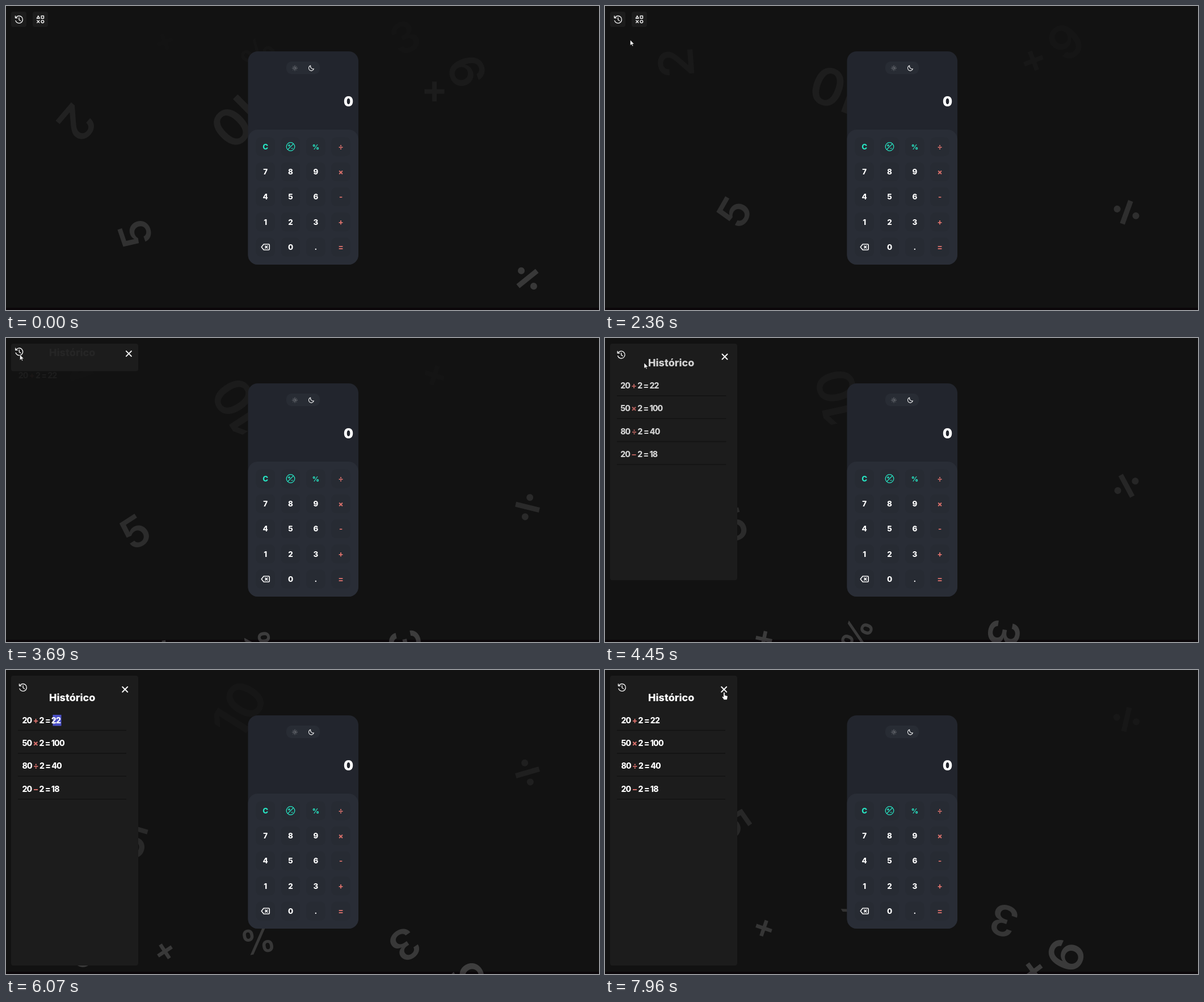
Animation, 1045 px wide and 536 px high, one loop 8 s. Source, as an HTML page:

```html
<!DOCTYPE html>
<html lang="pt">
<head>
<meta charset="utf-8">
<title>Calculadora</title>
<style>
html, body { margin: 0; width: 100%; height: 100%; overflow: hidden; background: #121212; }
svg { display: block; width: 100%; height: 100%; font-family: Inter, "Open Sans", sans-serif; font-weight: 800; }
text { white-space: pre; }
.mid { text-anchor: middle; }
.line { fill: none; stroke: #f4f4f4; stroke-width: 1.4; stroke-linecap: round; stroke-linejoin: round; }
.op { fill: #d8706b; }
.fn { fill: #27e6c4; }
.item { font-size: 14px; letter-spacing: -.85px; }
</style>
</head>
<body>
<svg viewBox="0 0 1045 536" fill="#fff">
  <clipPath id="fold"><rect id="foldBox" width="260"/></clipPath>
  <rect y="532" width="1045" height="4" fill="#0b070a"/>
  <g id="floats"></g>

  <g id="calc">
    <rect x="426.5" y="80" width="194.5" height="376" rx="17" fill="#22252d"/>
    <rect x="426.5" y="218" width="194.5" height="238" rx="17" fill="#292d36"/>
    <rect x="494" y="98" width="59" height="22" rx="9" fill="#282c34"/>
    <g transform="translate(509 109.5)" class="line" style="stroke:#8b8d92;stroke-width:.9" id="sun"><circle r="1.9"/></g>
    <path transform="translate(538 109.5)" class="line" style="stroke-width:1.1" d="M-1.3-4.4A4.6 4.6 0 1 0 4.5 1.2A4.6 4.6 0 0 1-1.3-4.4Z"/>
    <text x="612" y="177" font-size="24" font-weight="900" text-anchor="end">0</text>
    <g id="keys" font-size="13.3" class="mid"></g>
  </g>

  <g id="menuButton">
    <rect x="47" y="10" width="27" height="27" rx="4" fill="#1c1c1c"/>
    <path transform="translate(60.5 23.5)" class="line" d="M-3.7-6.2L-6.2-1.7H-1.2ZM1.7-6H6V-1.7H1.7ZM-5.7 1.9L-1.7 5.9M-1.7 1.9L-5.7 5.9M6.2 3.9a2.3 2.3 0 1 1-4.6 0a2.3 2.3 0 1 1 4.6 0Z"/>
  </g>

  <g id="history">
    <rect id="panel" x="9" y="10" rx="4" fill="#1c1c1c"/>
    <path id="clock" class="line" d="M-5.5-3.4A6.4 6.4 0 1 1-6.1 1.9M-6.5-6.3V-2.9H-3.1M0-3.3V.3L2.4 2"/>
    <path id="close" class="line" style="stroke-width:2" d="M-4.5-4.5L4.5 4.5M4.5-4.5L-4.5 4.5"/>
    <g clip-path="url(#fold)">
      <g id="list">
        <text class="mid" x="116.7" y="55" font-size="18">Histórico</text>
        <rect id="mark" y="79" height="19.5" fill="#4b50c5"/>
        <g id="rows"></g>
      </g>
    </g>
  </g>

  <g id="popup" font-size="6" font-weight="400" class="mid">
    <rect x="4" y="53" width="117" height="19" rx="3" fill="#1f1c2b"/>
    <path d="M44 58V67M78 58V67" stroke="#45414f" stroke-width=".7"/>
    <g fill="#dedce4"><text x="24" y="64.7">Pesquisar</text><text x="59.5" y="64.7">Copiar</text><text x="98" y="64.7">Instantâneo</text></g>
  </g>

  <g id="cursor">
    <path d="M0 0V9.6L2.3 7.5 3.8 10.8 5.2 10.2 3.7 7H6.8Z" stroke="#111" stroke-width=".5"/>
    <path d="M-1.8-4H-.5L0-3.5L.5-4H1.8M0-3.5V3.5M-1.8 4H-.5L0 3.5L.5 4H1.8" fill="none" stroke="#ddd" stroke-width=".9"/>
    <path d="M-1.2 1Q-1.2-.3 0-.3T1.2 1V5L5.5 6.2Q6.3 6.6 6.1 7.6L5 13H-.2L-3.6 8.6Q-3.7 7.2-2.4 7.3L-1.2 8.2Z" stroke="#111" stroke-width=".5"/>
  </g>
</svg>
<script>
const $ = id => document.getElementById(id);
const LOOP = 8000, RISE = 564;

const glyph = (s, size) =>
  `<text class="mid" font-size="${size}" font-weight="600" y="${size * .364}">${s}</text>`;
const cross = (r, w) => `<path d="M${-r} 0H${r}M0 ${-r}V${r}" stroke="#fff" stroke-width="${w}"/>`;

// Each symbol: x, start y, progress at time 0, duration of one rise, shape
const symbols = [
  [125, 590, .681, 12560, glyph('2', 85)],
  [411, 588, .688, 26200, glyph('10', 91)],
  [227.5, 598, .349, 35000, glyph('5', 75)],
  [703, 598, .963, 25400, glyph('3', 75)],
  [812, 592, .846, 25500, glyph('9', 84)],
  [444, 610, .9315, 20000, glyph('%', 61)],
  [755, 609, .8125, 24560, `<g transform="rotate(45)">${cross(17.5, 8)}</g>`],
  [280, 611, .971, 26100, cross(14.5, 6.5)],
  [919, 591, .196, 11420,
    '<path d="M-21.5 0H21.5" stroke="#fff" stroke-width="9"/><circle cy="-17.5" r="6"/><circle cy="17.5" r="6"/>'],
];
$('floats').innerHTML = symbols.map(s => `<g>${s[4]}</g>`).join('');
const floats = [...$('floats').children];

for (let i = 0; i < 8; i++)
  $('sun').innerHTML += `<path transform="rotate(${i * 45})" d="M0-3.6V-4.4"/>`;

const signIcon = '<g class="line" style="stroke:#27e6c4;stroke-width:1.2"><circle r="7.3"/><path d="M-5 5L5-5M-4.3-2.2H-.9M-2.6-3.9V-.5M1.2 3H4.2"/></g>';
const eraseIcon = '<path class="line" style="stroke-width:1.7" d="M-3-5H5.5Q7 -5 7-3.5V3.5Q7 5 5.5 5H-3L-7 0ZM-.4-1.9L3.4 1.9M3.4-1.9L-.4 1.9"/>';
const labels = ['C', signIcon, '%', '÷', '7', '8', '9', '×', '4', '5', '6', '-', '1', '2', '3', '+', eraseIcon, '0', '.', '='];
$('keys').innerHTML = labels.map((s, i) => {
  const col = i % 4, row = i >> 2;
  const kind = col == 3 ? 'op' : row ? '' : 'fn';
  const face = s.length > 1 ? s : `<text class="${kind}" y="4.8" ${s == '%' ? 'font-size="12"' : ''}>${s}</text>`;
  return `<g transform="translate(${457.2 + col * 44.3} ${248 + row * 44.25})">
    <rect x="-16.5" y="-16.5" width="33" height="33" rx="8" fill="#272b33"/>${face}</g>`;
}).join('');

const sums = [['20', '+', '2 = 22'], ['50', '×', '2 = 100'], ['80', '÷', '2 = 40'], ['20', '−', '2 = 18']];
$('rows').innerHTML = sums.map(([a, op, b], i) => `<g transform="translate(0 ${i * 40.4})">
  <text class="item" y="93.6">${a} <tspan class="op">${op}</tspan> ${b}</text>
  <path class="rule" stroke="#121212" stroke-width="1.6"/></g>`).join('');
const items = document.querySelectorAll('.item'), rules = document.querySelectorAll('.rule');
const firstOp = items[0].querySelector('tspan');

const clamp = v => Math.max(0, Math.min(1, v));
const span = (t, a, b) => clamp((t - a) / (b - a));

// CSS "ease" curve
function ease(x) {
  let lo = 0, hi = 1, s = .5;
  for (let i = 0; i < 24; i++) {
    s = (lo + hi) / 2;
    if (.75 * s * (1 - s) ** 2 + .75 * s * s * (1 - s) + s ** 3 < x) lo = s; else hi = s;
  }
  return .3 * s * (1 - s) ** 2 + 3 * s * s * (1 - s) + s ** 3;
}

// Pointer path: time, x, y
const path = [[1760, 130, 545], [2260, 45, 62], [2360, 44.5, 60], [2550, 42, 56], [3200, 24.5, 31],
  [3690, 24.5, 29.5], [4000, 30, 32], [4450, 69, 44], [5000, 140, 80], [5370, 159.5, 90],
  [5900, 98, 90], [6500, 28, 92], [6830, 53.5, 101], [7150, 62, 102], [7580, 209, 41], [7960, 210, 39.5]];
function pointer(t) {
  let i = 0;
  while (i < path.length - 2 && t > path[i + 1][0]) i++;
  const [t0, x0, y0] = path[i], [t1, x1, y1] = path[i + 1];
  const k = span(t, t0, t1), s = k * k * (3 - 2 * k);
  return [x0 + (x1 - x0) * s, y0 + (y1 - y0) * s];
}

const show = (el, on) => el.style.display = on ? '' : 'none';
const move = (el, x, y) => el.setAttribute('transform', `translate(${x} ${y})`);

function draw(t) {
  symbols.forEach(([x, y, start, time], i) => {
    const p = (start + t / time) % 1;
    floats[i].setAttribute('transform', `translate(${x} ${y - RISE * p}) rotate(${720 * p})`);
    floats[i].setAttribute('opacity', .2 * (1 - p));
  });

  const open = t >= 3585, p = open ? ease(span(t, 3585, 5305)) : 0, rest = 1 - p;
  const height = 27 + 484 * p;
  $('panel').setAttribute('width', open ? 224 : 27);
  $('panel').setAttribute('height', height);
  $('foldBox').setAttribute('height', height + 26);
  move($('clock'), 30 - 7 * rest, 31 - 7 * rest);
  move($('close'), 209.7 + 7 * rest, 34.3 - 7 * rest);
  show($('close'), open);
  show($('menuButton'), !open);
  show($('list'), open);
  $('list').setAttribute('opacity', p);
  move($('list'), 0, -24 * rest);
  items.forEach(el => el.setAttribute('x', 28.5 - 7 * rest));
  rules.forEach(el => el.setAttribute('d', `M21 106.5H${212 + 7 * rest}`));

  const left = 97.5 - 68.5 * span(t, 5950, 6500), marked = t > 5950 && t < 7250;
  show($('mark'), marked);
  $('mark').setAttribute('x', left);
  $('mark').setAttribute('width', 97.5 - left);
  firstOp.style.fill = marked && left < 50 ? '#fff' : '';
  show($('popup'), t >= 6750 && t < 7250);

  const [x, y] = pointer(t);
  const shape = t > 7480 ? 2 : t > 5800 && t < 7250 ? 1 : 0;
  move($('cursor'), x, y);
  show($('cursor'), t >= 1760);
  [...$('cursor').children].forEach((el, i) => show(el, i == shape));
}

const begin = performance.now();
function tick() {
  draw((performance.now() - begin) % LOOP);
  requestAnimationFrame(tick);
}
tick();
</script>
</body>
</html>
```
